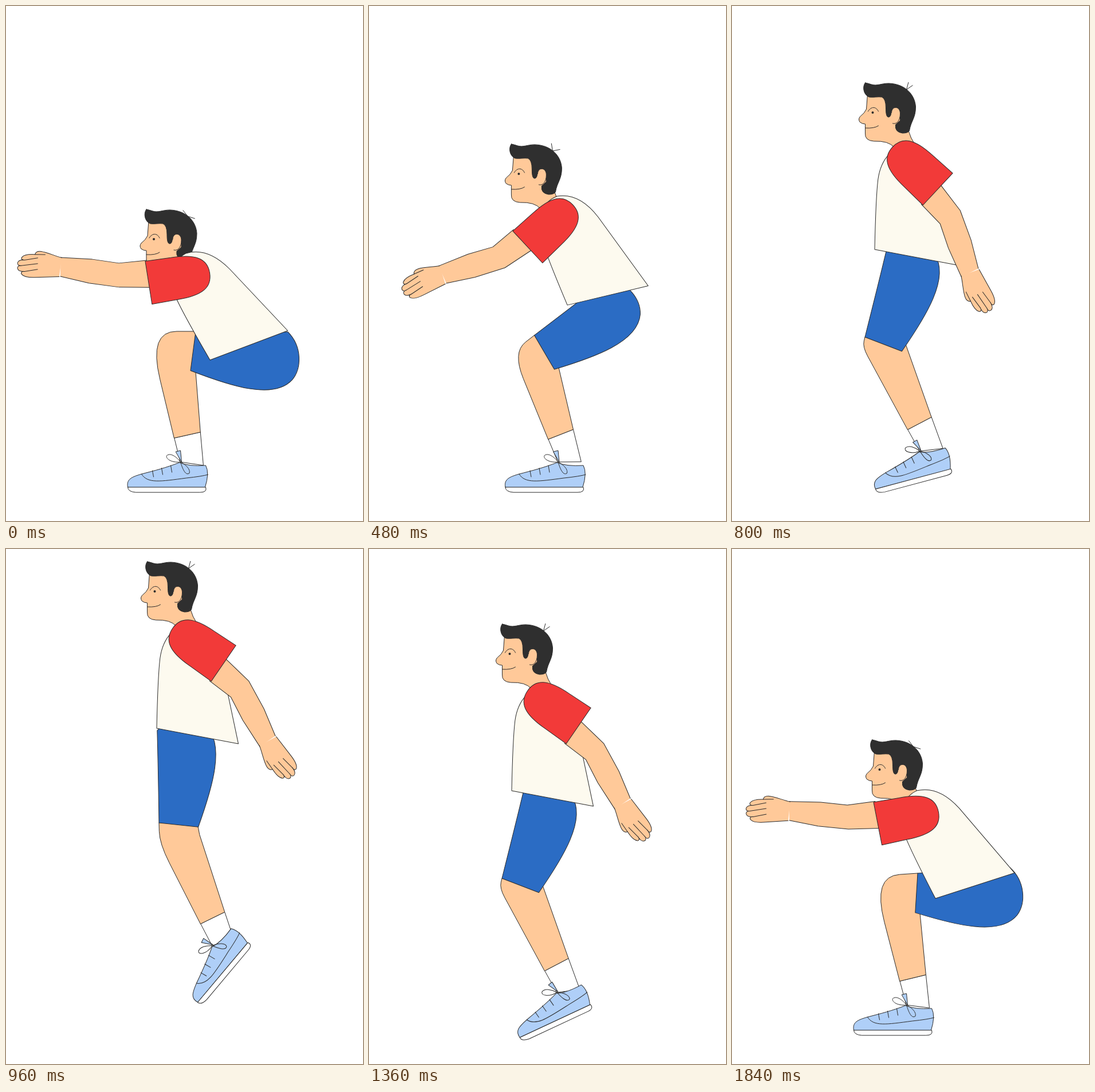
These frames come from a looping animation (623 px wide and 899 px high, 1.92 s). An HTML page with a canvas:

```html
<!DOCTYPE html>
<html lang="en">
<head>
<meta charset="utf-8">
<title>Squat jump</title>
<style>
  html, body { margin: 0; width: 100%; height: 100%; overflow: hidden; background: #fff; }
  canvas { display: block; width: 623px; height: 899px; }
</style>
</head>
<body>
<canvas id="stage" width="623" height="899"></canvas>
<script>
const ctx = document.getElementById('stage').getContext('2d');
const LOOP = 1920;
const INK = '#2b2b2b', SKIN = '#ffc999', RED = '#f23a39', CREAM = '#fdfaef',
      BLUE = '#2b6cc4', SHOE = '#afcff8', HAIR = '#2f2f2f', WHITE = '#fff';

// The body is a set of rigid parts. A joint is [x, y, degrees].
const squat = {
  shirt: [356, 618, -20.7], shoulder: [318, 472, 81], bend: 17, hem: [331, 568, 97.5],
  shin: 9, foot: [304.5, 796, 0], head: [-2, 137], wisp: 73
};
const dip = {
  ...squat, shirt: [355, 610, -17.9], shoulder: [323, 466, 79], hem: [324, 566, 93.5],
  shin: 10, head: [-2.5, 115]
};
const rise = {
  shirt: [344, 579, -11.9], shoulder: [324, 433, 68], bend: 18.5, hem: [318, 564, 92],
  shin: 14.5, foot: [315.5, 796, 0], head: [5, 82], wisp: 80
};
const stand = {
  shirt: [347, 500, -14], shoulder: [329, 351, 6], bend: 42, hem: [277, 579, 47],
  shin: 19, foot: [330, 796, 0], head: [0, 0], wisp: 30
};
const leap = {
  shirt: [263, 313, 10.7], shoulder: [322, 160, -55.5], bend: 27.5, hem: [267, 478, 6],
  shin: 22.5, foot: [360, 692.5, -50], head: [-0.5, -196], wisp: 20
};

const lerp = (a, b, t) => Array.isArray(a) ? a.map((v, i) => lerp(v, b[i], t)) : a + (b - a) * t;
const mix = (a, b, t) => Object.fromEntries(Object.keys(a).map(k => [k, lerp(a[k], b[k], t)]));
const move = (pose, dx, dy) => Object.fromEntries(Object.entries(pose).map(
  ([k, v]) => [k, Array.isArray(v) ? [v[0] + dx, v[1] + dy, ...v.slice(2)] : v]));

const lift = {
  ...mix(rise, stand, 0.72), shoulder: [328, 373, 47], bend: 26, foot: stand.foot
};
const land = {
  ...move(leap, -14, 109), hem: [232, 575, 21], shin: 24, foot: [328, 774, -25]
};
const launch = {
  ...move(land, 0, 3), shoulder: [308, 272, -47], foot: [328, 777, -15]
};

const timeline = [
  [0, squat], [240, dip], [320, rise], [480, lift], [640, stand], [800, launch],
  [960, leap], [1200, move(leap, -2, 17)], [1360, land], [1520, stand],
  [1680, rise], [1840, dip]
];

const rad = deg => deg * Math.PI / 180;
const along = (p, dir, d) => [p[0] + dir[0] * d, p[1] + dir[1] * d];
const below = deg => [-Math.sin(rad(deg)), Math.cos(rad(deg))];
const across = deg => [Math.cos(rad(deg)), Math.sin(rad(deg))];
const point = ([x, y, deg], dx, dy) => along(along([x, y], across(deg), dx), below(deg), dy);

function within([x, y, deg = 0], draw) {
  ctx.save();
  ctx.translate(x, y);
  ctx.rotate(rad(deg));
  draw();
  ctx.restore();
}
function shape(path, fill) {
  ctx.fillStyle = fill;
  ctx.fill(path);
  ctx.stroke(path);
}
function polygon(points) {
  const path = new Path2D();
  points.forEach(p => path.lineTo(...p));
  path.closePath();
  return path;
}

const shirt = new Path2D(`M0 0 H145 L88 -137 Q66 -186 27 -189
  C0 -186 -19 -160 -17 -121 Q-15 -90 0 0 Z`);
const shorts = new Path2D(`M0 0 H69 C86 -70 102 -150 62 -178
  C40 -192 2 -188 -20 -160 Q-12 -100 0 0 Z`);
const sleeve = new Path2D(`M-38 70 L-37 25 C-37 -20 -25 -38 0 -38
  C25 -38 37 -20 37 25 L38 70 Z`);

const face = new Path2D(`M251 238 L249 264 Q246 271 238 277 Q234 282 238 287 Q242 290 247 290
  V306 Q246 319 262 320 Q288 319 298 331 L310 345 L336 330 L327 314 L323 303 L300 235 Z`);
const hair = new Path2D(`M247 218 C241 226 245 240 254 243 C260 244 270 242 276 243
  Q283 246 283 262 C283 272 284 278 288 278 Q292 278 293 266 H308 V284 L300 291
  Q298 304 312 306 Q321 306 324 302 C327 284 335 280 335 260 C334 240 318 220 288 219
  C275 219 268 224 258 221 Q252 219 247 218 Z`);
const ear = new Path2D('M293 270 C293 258 308 258 308 272 C308 284 302 291 295 289');
const features = new Path2D('M252 268 C257 259 266 259 270 268 M247 297 Q263 298 270 293');

// Shoe parts are drawn around the knot of the laces.
const upper = new Path2D(`M-92 44 C-95 30 -85 26 -68 21 C-45 15 -25 10 -2 1
  Q15 8 44 6 Q51 19 43 44 Z`);
const sole = new Path2D('M-92 44 H44 Q47 53 34 53 H-78 Q-92 52 -92 44 Z');
const tongue = new Path2D('M-8 -18 L0 -20 L2 0 Z');
const laces = new Path2D(`M-68 21 C-58 38 -35 34 10 28 Q38 25 48 22
  M0 0 C-18 2 -28 -8 -23 -12 C-16 -16 -6 -8 0 0 C12 6 18 15 15 20 C8 24 3 10 0 0`);
for (let i = 0; i < 3; i++) {
  laces.moveTo(-49 + 16 * i, 15 - 4.5 * i);
  laces.lineTo(-47 + 16 * i, 26 - 4 * i);
}

function makeHand() {
  const gap = i => [6 * (i - 2) ** 2 - 69, 10 * i - 21];
  const outline = new Path2D('M2 -16 C-18 -21 -42 -34 -45 -21');
  const creases = new Path2D('M-45 -21 H-27');
  for (let i = 0; i < 4; i++) {
    const [x, y] = gap(i), [nextX, nextY] = gap(i + 1);
    const tip = Math.min(x, nextX) - 9;
    outline.bezierCurveTo(tip, y - 1, tip, nextY + 1, nextX, nextY);
    if (i > 0) {
      creases.moveTo(x, y);
      creases.lineTo(-40, y - 4);
    }
  }
  outline.lineTo(-2, 17);
  return { outline, creases };
}
const hand = makeHand();

function drawLeg({ hem, shin, foot }) {
  const ankle = [...point([foot[0], foot[1], -shin], -4.5, -43), -shin];
  const calf = point(ankle, 47, -3);
  shape(polygon([ankle, calf, point(ankle, 43, 55), foot].map(p => p.slice(0, 2))), WHITE);

  // The knee rounds off the corner where the thigh line meets the shin line.
  const thigh = along(below(hem[2]), across(hem[2]), 0.13);
  const front = below(-shin - 4.5);
  const cross = (u, v) => u[0] * v[1] - u[1] * v[0];
  const reach = cross([ankle[0] - hem[0], ankle[1] - hem[1]], front) / cross(thigh, front);
  const knee = along(hem, thigh, reach);
  const leg = new Path2D();
  leg.moveTo(hem[0], hem[1]);
  leg.lineTo(...along(hem, thigh, reach * 0.4));
  leg.quadraticCurveTo(...knee, ...along(knee, front, reach * 1.05));
  leg.lineTo(ankle[0], ankle[1]);
  leg.lineTo(...calf);
  leg.lineTo(...along(calf, below(-shin + 4.5), -142));
  leg.lineTo(...point(hem, 68, -2));
  leg.closePath();
  shape(leg, SKIN);

  within(foot, () => {
    shape(tongue, SHOE);
    shape(upper, SHOE);
    shape(sole, WHITE);
    ctx.stroke(laces);
  });
}

function drawHead({ head, wisp }) {
  within(head, () => {
    shape(face, SKIN);
    shape(hair, HAIR);
    shape(ear, SKIN);
    ctx.stroke(features);
    ctx.beginPath();
    ctx.arc(260, 270, 2, 0, 7);
    ctx.fillStyle = INK;
    ctx.fill();
    for (const side of [-1, 1]) {
      ctx.beginPath();
      ctx.moveTo(319, 230);
      ctx.lineTo(...along([319, 230], below(35 + side * wisp), -13));
      ctx.stroke();
    }
  });
}

function drawArm({ shoulder, bend }) {
  within(shoulder, () => {
    const elbow = [-21, 119], forearm = below(bend);
    const wrist = along(elbow, forearm, 103);
    const edge = side => [
      [-15 + side * 24, 67],
      along(elbow, across(bend / 2), side * 21),
      along(along(elbow, forearm, 50), across(bend), side * 21),
      along(wrist, across(bend - 7), side * 16.5)
    ];
    const sides = [edge(-1), edge(1)];
    ctx.fillStyle = SKIN;
    ctx.fill(polygon([...sides[0], ...sides[1].reverse()]));
    for (const side of sides) {
      const path = new Path2D();
      side.forEach(p => path.lineTo(...p));
      ctx.stroke(path);
    }
    within([...wrist, bend - 97], () => {
      shape(hand.outline, SKIN);
      ctx.stroke(hand.creases);
    });
    shape(sleeve, RED);
  });
}

function drawFigure(pose) {
  drawLeg(pose);
  within(pose.hem, () => shape(shorts, BLUE));
  drawHead(pose);
  within(pose.shirt, () => shape(shirt, CREAM));
  drawArm(pose);
}

function frame() {
  const t = performance.now() % LOOP;
  ctx.fillStyle = WHITE;
  ctx.fillRect(0, 0, 623, 899);
  ctx.strokeStyle = INK;
  ctx.lineWidth = 1;
  ctx.lineJoin = 'round';
  ctx.lineCap = 'round';
  drawFigure(timeline.findLast(([start]) => start <= t)[1]);
  requestAnimationFrame(frame);
}
frame();
</script>
</body>
</html>
```
